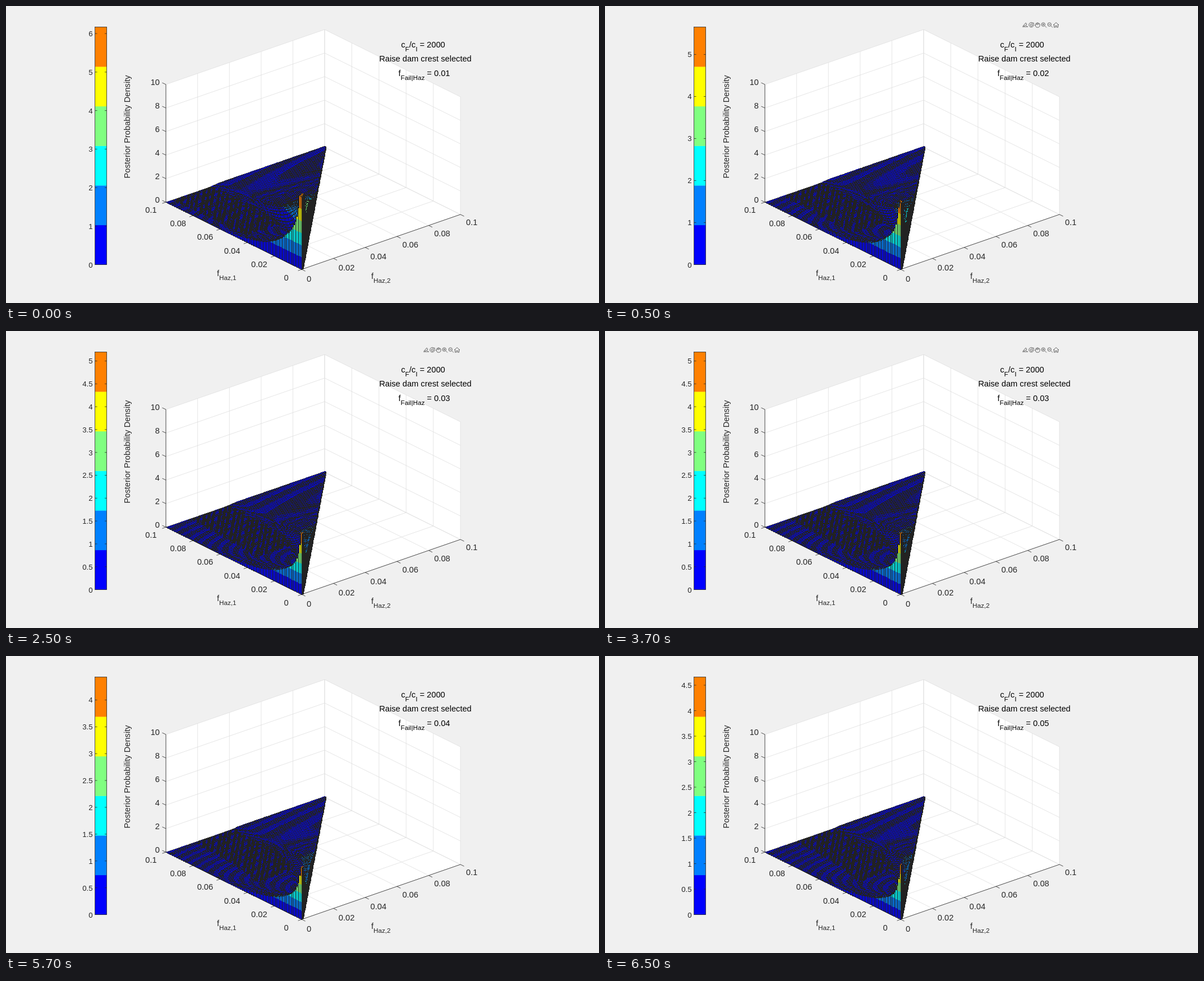
Write an HTML page with a canvas that moves like this. It is 1057 by 530 pixels and loops after 8 s.

```html
<!DOCTYPE html>
<html lang="en">
<head>
<meta charset="utf-8">
<title>Posterior density</title>
<style>
html, body { margin: 0; width: 100%; height: 100%; overflow: hidden; background: #f0f0f0; }
svg, canvas { position: absolute; left: 0; top: 0; }
text { font: 14.67px "Liberation Sans", Arial, sans-serif; fill: #262626; white-space: pre; }
.bar text { font-size: 13.2px; text-anchor: end; }
.title text { fill: #000; text-anchor: middle; }
text .sub { font-size: 11.7px; }
</style>
</head>
<body>
<svg id="plot" width="1057" height="530" viewBox="0 0 1057 530"></svg>
<canvas id="bars" width="1057" height="530"></canvas>
<script>
const LOOP = 8000;
// start, fail: probability shown, max: top density, tick: scale step,
// wall/decay: profile along the first axis, edge: where the far step begins
const steps = [
  { start: 0,    fail: '0.01', max: 6.17,  tick: 1,  wall: 4.7,  decay: 15.5, fall: 12, edge: 30, far: 1 },
  { start: 500,  fail: '0.02', max: 5.653, tick: 1,  wall: 3.95, decay: 16.3, fall: 10, edge: 37, far: .85, tools: true },
  { start: 2500, fail: '0.03', max: 5.196, tick: .5, wall: 3.1,  decay: 17,   fall: 9,  edge: 41, far: .78, tools: true },
  { start: 4500, fail: '0.04', max: 4.428, tick: .5, wall: 2.8,  decay: 16,   fall: 8,  edge: 44, far: .78 },
  { start: 6500, fail: '0.05', max: 4.66,  tick: .5, wall: 2.5,  decay: 16,   fall: 8,  edge: 46, far: .74 }
];
const bands = [[0, 0, 255], [0, 128, 255], [0, 255, 255], [128, 255, 128], [255, 255, 0], [255, 128, 0]];
const DARK = '#262626', GRID = '#dfdfdf', UNIT = 21;
const svg = document.getElementById('plot');

// a, b in hundredths of each axis; z in density units
const project = (a, b, z = 0) => [527 - 2.42 * a + 2.83 * b, 470 - 1.2 * a - .98 * b - UNIT * z];

function add(parent, tag, attrs, content = '') {
  const el = document.createElementNS('http://www.w3.org/2000/svg', tag);
  for (const k in attrs) el.setAttribute(k, attrs[k]);
  el.innerHTML = content;
  parent.append(el);
  return el;
}
const line = (parent, [x1, y1], [x2, y2], stroke, width = .8) =>
  add(parent, 'line', { x1, y1, x2, y2, stroke, 'stroke-width': width });
const label = (parent, x, y, content, anchor) =>
  add(parent, 'text', anchor ? { x, y, 'text-anchor': anchor } : { x, y }, content);
const sub = s => `<tspan class="sub" dy="6.5">${s}</tspan><tspan dy="-6.5">&#8203;</tspan>`;

function drawAxes() {
  const outline = [project(100, 0, 10), project(100, 100, 10), project(0, 100, 10),
    project(0, 100), project(0, 0), project(100, 0)];
  add(svg, 'polygon', { points: outline.join(' '), fill: '#fff' });
  for (let i = 0; i <= 5; i++) {
    const k = i * 20, z = i * 2;
    line(svg, project(100, k), project(100, k, 10), GRID);
    line(svg, project(k, 100), project(k, 100, 10), GRID);
    line(svg, project(k, 0), project(k, 100), GRID);
    line(svg, project(0, k), project(100, k), GRID);
    line(svg, project(100, 0, z), project(100, 100, z), GRID);
    line(svg, project(100, 100, z), project(0, 100, z), GRID);
  }
  line(svg, project(100, 0), project(100, 0, 10), DARK);
  line(svg, project(100, 0), project(0, 0), DARK);
  line(svg, project(0, 0), project(0, 100), DARK);
  for (let i = 0; i <= 5; i++) {
    const tick = ([x, y], dx, dy) => line(svg, [x, y], [x + dx, y + dy], DARK);
    tick(project(100, 0, i * 2), -6.5, -3);
    tick(project(i * 20, 0), -6.5, 2.3);
    tick(project(0, i * 20), 6.5, 3.2);
    label(svg, 274, 351 - 42 * i, i * 2, 'end');
    label(svg, 258.5 + 48.2 * i, 369 + 24.2 * i, +(.1 - i * .02).toFixed(2), 'middle');
    label(svg, 536 + 56.8 * i, 492 - 20.2 * i, +(i * .02).toFixed(2));
  }
  label(svg, 376, 482, 'f' + sub('Haz,1'));
  label(svg, 651, 487, 'f' + sub('Haz,2'));
  add(svg, 'text', { transform: 'translate(221 215.5) rotate(-90)', 'text-anchor': 'middle' },
    'Posterior Probability Density');
  const title = add(svg, 'g', { class: 'title' });
  label(title, 743.5, 74, `c${sub('F')}/c${sub('I')} = 2000`);
  label(title, 747.5, 99, 'Raise dam crest selected');
}

function drawScale(parent, step) {
  const g = add(parent, 'g', { class: 'bar' });
  const H = 424, bottom = 461.5;
  bands.forEach((c, i) => add(g, 'rect', {
    x: 159, y: bottom - (i + 1) * H / 6, width: 20.5, height: H / 6 + .3, fill: `rgb(${c})` }));
  add(g, 'rect', { x: 158.5, y: 37.5, width: 21, height: H, fill: 'none', stroke: DARK, 'stroke-width': .8 });
  for (let v = 0; v <= step.max; v += step.tick) {
    const y = bottom - v / step.max * H;
    line(g, [159, y], [162.5, y], DARK);
    line(g, [176, y], [179.5, y], DARK);
    label(g, 154.5, y + 5, v);
  }
}

function drawTools(parent) {
  const icons = [
    'M-5 3H5M-4 2L1-4L3-1L-2 2ZM2 1L4 3',
    'M4-1A4.2 4.2 0 1 1 2-4M-2 0A2 2 0 1 0 2 0A2 2 0 1 0-2 0M1-3L4-4V-1',
    'M-2 4L-5 0L-3 0V-3H-1V-4H1V-3H3V-2H4V2L2 4ZM-1-3V0M1-3V0',
    'M-4-1A3.2 3.2 0 1 0 2.4-1A3.2 3.2 0 1 0-4-1M2 1.5L5 4.5M-2.5-1H1M-.8-2.7V.7',
    'M-4-1A3.2 3.2 0 1 0 2.4-1A3.2 3.2 0 1 0-4-1M2 1.5L5 4.5M-2.5-1H1',
    'M-5 0L0-4.5L5 0M-3.5-1V4H-1V1H1V4H3.5V-1'
  ];
  icons.forEach((d, i) => add(parent, 'path', {
    d, transform: `translate(${749 + 11 * i} 34)`, fill: 'none', stroke: '#666', 'stroke-width': 1 }));
}

const stepEdge = (a, s) => s.edge / (1 + (s.edge / (a + .01)) ** 3.3) ** (1 / 3.3);

function density(a, b, s) {
  if (a + b === 0) return s.max;
  const near = s.wall * Math.exp(-a / s.decay - b / s.fall);
  const ridge = s.far * s.max * Math.exp(-((a / 34) ** 1.5)) + .06;
  return Math.min(s.max, near + ridge / (1 + Math.exp((stepEdge(a, s) - b) / 1.2)));
}

// Hard-edged bars, painted from back to front
function renderBars(s) {
  const X0 = 275, Y0 = 225, W = 305, H = 255;
  const img = new ImageData(W, H);
  const px = new Uint32Array(img.data.buffer);
  const pack = ([r, g, b]) => (255 << 24 | b << 16 | g << 8 | r) >>> 0;
  const palette = bands.map(pack), edge = pack([34, 34, 34]);
  const colour = z => palette[Math.max(0, Math.min(5, Math.floor(z / s.max * 6)))];
  const dot = (x, y, c) => {
    x = Math.round(x) - X0; y = Math.round(y) - Y0;
    if (x >= 0 && y >= 0 && x < W && y < H) px[y * W + x] = c;
  };
  const stroke = ([x1, y1], [x2, y2]) => {
    const n = Math.max(1, Math.ceil(Math.max(Math.abs(x2 - x1), Math.abs(y2 - y1))));
    for (let i = 0; i <= n; i++) dot(x1 + (x2 - x1) * i / n, y1 + (y2 - y1) * i / n, edge);
  };
  const side = ([x1, y1], [x2, y2], h, paint) => {
    for (let x = Math.round(x1); x <= Math.round(x2); x++) {
      const base = y1 + (y2 - y1) * Math.max(0, Math.min(1, (x - x1) / (x2 - x1)));
      for (let y = base - h * UNIT; y <= base; y++) dot(x, y, paint((base - y) / UNIT));
    }
  };
  for (let a = 99; a >= 0; a--) {
    const c = stepEdge(a, s);
    for (let b = a; b >= 0; b--) {
      const h = density(a, b, s);
      const shaded = a > 45 && b < c - 1 && b > c - 26 && (a * 7 + b * 3) % 10 < 6;
      const top = shaded ? edge : colour(h - 1e-6);
      const front = project(a, b, h), left = project(a + 1, b, h);
      const right = project(a, b + 1, h), back = project(a + 1, b + 1, h);
      const f0 = project(a, b), l0 = project(a + 1, b), r0 = project(a, b + 1);
      for (let u = 0; u <= 1; u += .25) for (let v = 0; v <= 1; v += .25)
        dot(...project(a + u, b + v, h), top);
      side(f0, r0, h, () => edge);
      side(l0, f0, h, colour);
      stroke(left, back); stroke(back, right);
      stroke(left, front); stroke(front, right);
      stroke(left, l0); stroke(front, f0); stroke(l0, f0);
    }
  }
  return { img, x: X0, y: Y0 };
}

drawAxes();
for (const s of steps) {
  s.group = add(svg, 'g', { visibility: 'hidden' });
  drawScale(s.group, s);
  const title = add(s.group, 'g', { class: 'title' });
  label(title, 745.5, 125, `f${sub('Fail|Haz')} = ${s.fail}`);
  if (s.tools) drawTools(s.group);
  s.bars = renderBars(s);
}

const ctx = document.getElementById('bars').getContext('2d');
let shown = null;
function show(now) {
  const t = now % LOOP;
  const s = steps.filter(s => s.start <= t).pop();
  if (s !== shown) {
    if (shown) shown.group.setAttribute('visibility', 'hidden');
    s.group.setAttribute('visibility', 'visible');
    ctx.putImageData(s.bars.img, s.bars.x, s.bars.y);
    shown = s;
  }
}
const origin = performance.now();
function frame() {
  show(performance.now() - origin);
  requestAnimationFrame(frame);
}
frame();
</script>
</body>
</html>
```
